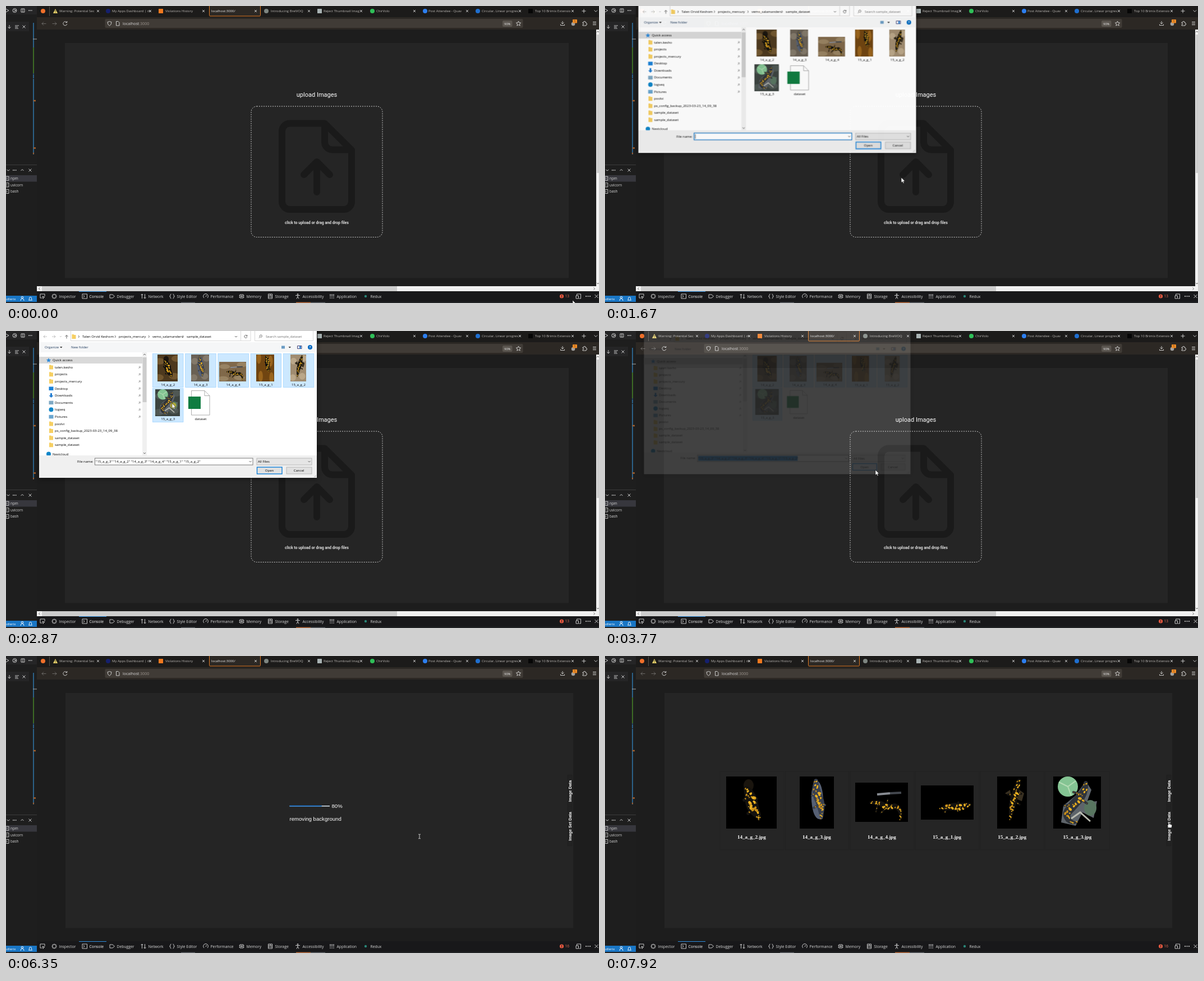
Write an HTML page that moves like this. It is 1057 px wide and 530 px high and loops after 7990 ms.

```html
<!DOCTYPE html>
<html lang="en">
<head>
<meta charset="utf-8">
<title>Image upload</title>
<style>
html, body { margin: 0; width: 100%; height: 100%; overflow: hidden; background: #1d1d1d; }
svg { display: block; }
#stage { width: 1057px; height: 530px; font: 6px "Open Sans", "Noto Sans", sans-serif; }
.ui { font-size: 6.8px; fill: #d8d8d8; }
.line { fill: none; stroke: #d8d8d8; stroke-width: .9; }
.dim { opacity: .4; }
.din { font-family: Roboto, sans-serif; text-anchor: middle; fill: #fff; }
.arial { font: 9.6px "Liberation Sans", Arial, sans-serif; fill: #fff; }
.side { font: bold 7.2px "Liberation Sans", Arial, sans-serif; fill: #fff; text-anchor: middle; }
.name { font: bold 9px "Liberation Serif", serif; fill: #fff; text-anchor: middle; }
.mid { text-anchor: middle; }
.dark { stroke: #555; }
#dialog { transform-origin: 306px 95px; filter: drop-shadow(0 1px 4px #0008); }
</style>
</head>
<body>
<svg id="stage" viewBox="0 0 1057 530">
  <rect width="1057" height="530" fill="#1d1d1d"/>

  <g id="editor">
    <rect width="55" height="530" fill="#1e1e1e"/>
    <rect width="55" height="15" fill="#252526"/>
    <rect y="28" width="41" height="17" fill="#252526"/>
    <path class="line" d="M-2 4l7 4-7 4M12 8a3.5 3.5 0 1 0 7 0a3.5 3.5 0 1 0-7 0M14 6l4 2-4 2M27 5h6v6h-6zM30 5v6M6 34v6m-2.500-2.500l2.500 2.500 2.500-2.500M16 35h7M16 37.500h5M16 40h6M29.500 34.500l5 5m0-5l-5 5"/>
    <path d="M40 8h1.500m1 0h1.500m1 0h1.500M12 293h1.500m1 0h1.500m1 0h1.500" stroke="#ccc" stroke-width="1.300"/>
    <path d="M49 30V265" stroke="#2b6188" stroke-width="2"/>
    <path d="M49 74V120" stroke="#3d6b25" stroke-width="2"/>
    <path d="M49 121v1m0 7v1" stroke="#1e1e1e" stroke-width="3"/>
    <path d="M48 59h7" stroke="#aaa"/>
    <path d="M49 169h4M49 253.500h4M48 263h2" stroke="#a5602d" stroke-width="2.500"/>
    <path d="M0 283.500H55" stroke="#3c3c3c"/>
    <path class="line" d="M1.500 292l2.500 2 2.500-2M26.500 294l2.500-2.500 2.500 2.500M40.500 290.500l5 5m0-5l-5 5"/>
    <rect y="302" width="55" height="11.500" fill="#37373d"/>
    <g id="shells" class="ui" style="font-size:6.400px"></g>
    <rect y="517" width="55" height="11" fill="#1976c5"/>
    <text x="-2" y="525.200" fill="#fff">udlerix</text>
    <path class="line" style="stroke:#fff" d="M26 526q0-4 3-4t3 4M27 520a2 1.500 0 1 0 4 0a2 1.500 0 1 0-4 0M40.500 525h6l-1-1.500v-2a2 2 0 0 0-4 0v2z"/>
  </g>

  <g id="upload" data-on="0-4020">
    <rect x="105" y="66" width="898" height="419.500" fill="#252525"/>
    <text class="din" x="554" y="162" font-size="11">upload Images</text>
    <rect x="437" y="179" width="234" height="233.500" rx="10" fill="none" stroke="#ddd" stroke-width=".9" stroke-dasharray="2 2"/>
    <path d="M506 209.500H568L616 257V349a14 14 0 0 1-14 14H506a14 14 0 0 1-14-14V223.500a14 14 0 0 1 14-14zM568 211V243a13.500 13.500 0 0 0 13.500 13.500H614M554 332V278m-23 23l23-23 23 23" fill="none" stroke="#1a1a1a" stroke-width="12" stroke-linecap="round" stroke-linejoin="round"/>
    <text class="din" x="554" y="388.500" font-size="7" font-weight="500">click to upload or drag and drop files</text>
    <path d="M55 500H1057V42H1052V509H55z" fill="#f0f0f0"/>
    <rect x="55" y="500" width="1002" height="9" fill="#f0f0f0"/>
    <path d="M64 500H697V509H64zM1053 51H1057V298H1053z" fill="#cdcdcd"/>
    <path class="line dark" d="M60.500 502.500l-2 2 2 2M1047.500 502.500l2 2-2 2M1053 47l2-2 2 2M1053 494l2 2 2-2"/>
  </g>

  <g id="work" data-on="4020-7990">
    <rect x="106" y="66" width="905" height="419.500" fill="#252525"/>
    <path d="M1001 212h8v56h-8zM1001 269h8v70h-8z" fill="#222" stroke="#1e1e1e" stroke-width=".5"/>
    <text class="side" transform="translate(1007.600 241) rotate(-90)">Image Data</text>
    <text class="side" transform="translate(1007.600 304) rotate(-90)">Image Set Data</text>
    <g id="progress"></g>
    <g id="results" data-on="6550-7990"></g>
  </g>

  <g id="browser">
    <rect x="55" width="1002" height="20" fill="#1c1b1a"/>
    <rect x="55" y="20" width="1002" height="22" fill="#2c2824"/>
    <rect x="362.500" y="-2" width="91" height="20" rx="1.500" fill="#2c2824" stroke="#e07a22"/>
    <circle cx="66" cy="9" r="4" fill="#f0702a"/>
    <path d="M77.500 1V18" stroke="#55504a"/>
    <g id="tabs"></g>
    <path class="line" d="M1026.500 9h7m-3.500-3.500v7M1048.500 7.500l2.800 2.800 2.800-2.800"/>
    <rect x="176.500" y="23" width="745" height="16" rx="2" fill="#403b36"/>
    <path class="line dim" d="M71.500 31.500h-7.500m3-3l-3 3 3 3M82.500 31.500h7.500m-3-3l3 3-3 3"/>
    <path class="line" d="M108 29a3.500 3.500 0 1 0 .8 3M108.800 27v2.500h-2.500M184.500 27.500l3.500 1.200q0 5-3.500 6.500-3.500-1.500-3.500-6.500zM196.500 27.500h3.500l2 2v5.500h-5.500zM913.500 27l1.200 2.800 3 .3-2.300 2 .8 3-2.700-1.600-2.700 1.600.8-3-2.300-2 3-.3zM992 27v5m-2.500-2.500l2.500 2.500 2.500-2.500M988.500 32.500v2h7v-2M1028 29h2a1.300 1.300 0 1 1 2.500 0h1.500v2a1.300 1.300 0 1 1 0 2.500v1.500h-6v-2a1.200 1.200 0 1 0 0-2zM1046 28.500h6M1046 31h6M1046 33.500h6"/>
    <text class="ui" x="208" y="34" style="font-size:7px">localhost<tspan fill="#9b958e">:3000</tspan></text>
    <rect x="885" y="26" width="17.500" height="11" rx="2" fill="#5a554f"/>
    <text class="mid" x="893.700" y="33.700" fill="#eee" font-size="5.500">90%</text>
    <circle cx="1011" cy="32" r="3.300" fill="#a0a0a0"/>
    <rect x="1010" y="24" width="8" height="6.500" rx="1" fill="#f08a24"/>
    <text class="mid" x="1014" y="29.300" font-size="5" fill="#222">1</text>
  </g>

  <g id="devtools">
    <rect x="55" y="509" width="1002" height="19" fill="#18181a"/>
    <path d="M130 509.500H179" stroke="#2f8fe0" stroke-width="1.200"/>
    <rect y="528" width="1057" height="2" fill="#222426"/>
    <path d="M312 529.300h25" stroke="#70757a"/>
    <path d="M517 529.300h26" stroke="#c8703a" stroke-width="1.300"/>
    <path d="M543 529.300h26" stroke="#70757a"/>
    <g id="tools" class="ui"></g>
    <circle cx="990.500" cy="518" r="3.600" fill="#e2573f"/>
    <path d="M990.500 516v2.500m0 .8v1" stroke="#18181a"/>
    <g id="errors" class="ui" style="fill:#e0705a;font-size:6.400px"></g>
    <path class="line" d="M1017.500 517v-3h7v8h-3M1016 517h4.500v5h-4.500zM1049.500 515l6 6m0-6l-6 6"/>
    <path d="M1033 518h2m1.500 0h2m1.500 0h2" stroke="#d8d8d8" stroke-width="1.700"/>
  </g>

  <g id="dialog">
    <rect x="59" y="-10" width="495" height="272" fill="#fff"/>
    <rect x="59" y="222" width="495" height="40" fill="#f0f0f0"/>
    <g data-on="1600-7990">
      <rect x="59" y="20" width="495" height="18" fill="#f5f6f7"/>
      <path d="M115.500-2H436V17.500H115.500zM418.500 0V17M443.500-2H547.500V17.500H443.500z" fill="none" stroke="#d9d9d9"/>
      <path class="line dim dark" d="M73 10h-6m2.500-2.500l-2.500 2.500 2.500 2.500M82 10h6m-2.500-2.500l2.500 2.500-2.500 2.500M96 9l1.500 1.500 1.500-1.500"/>
      <path class="line dark" d="M108 13.500v-6m-2.500 2.500l2.500-2.500 2.500 2.500M408 9l2 2 2-2M429.500 8.500a2.500 2.500 0 1 0 .3 2M429.800 7v2h-2M451 12.500l2-2a2 2 0 1 1 1 .5"/>
      <path d="M117.500 6h3l1 1h3v7h-7z" fill="#f6cf63"/>
      <g id="crumbs"></g>
      <text x="463" y="12" fill="#6d6d6d">Search sample_dataset</text>
      <text x="69" y="31" fill="#1e395b">Organize</text>
      <path d="M96 28h4.500l-2.250 2.500zM503.500 28h4.500l-2.250 2.500z" fill="#333"/>
      <text x="116" y="31" fill="#1e395b">New folder</text>
      <rect x="491" y="26.500" width="6" height="5" fill="#6b9cc4"/>
      <path d="M519.500 26.500h7.500v5h-7.500z" fill="#fff" stroke="#447"/>
      <path d="M524.500 27v4.500" stroke="#3a8bd8" stroke-width="3"/>
      <circle cx="542" cy="29" r="4" fill="#0068c0"/>
      <text class="mid" x="542" y="31.300" fill="#fff" font-weight="bold">?</text>

      <rect x="59" y="46" width="184" height="12" fill="#d9d9d9"/>
      <rect x="243" y="38" width="8" height="184" fill="#f0f0f0"/>
      <rect x="243.500" y="47" width="7" height="80" fill="#cdcdcd"/>
      <path class="line dark" d="M245 43l2-2 2 2M245 217l2 2 2-2"/>
      <svg x="59" y="38" width="184" height="184" viewBox="59 38 184 184"><g id="places"></g></svg>
      <g id="files"></g>

      <text x="127" y="235">File name:</text>
      <rect x="158.500" y="227" width="281.500" height="12" fill="#fff" stroke="#7a7a7a"/>
      <rect data-on="0-2460" x="158.500" y="227" width="281.500" height="12" fill="#fff" stroke="#0078d7"/>
      <path data-on="1670-2460" d="M160.700 229v8" stroke="#000" stroke-width=".7"/>
      <text data-on="2460-2800" x="160" y="235">14_a_g_2</text>
      <rect data-on="3550-7990" x="160" y="228.500" width="185" height="9" fill="#0078d7"/>
      <text data-on="2800-7990" x="160" y="235">"15_a_g_3" "14_a_g_2" "14_a_g_3" "14_a_g_4" "15_a_g_1" "15_a_g_2"</text>
      <rect x="447" y="227" width="98" height="12" fill="#e5e5e5" stroke="#adadad" stroke-width=".8"/>
      <text x="449" y="235">All Files</text>
      <path class="line dark" d="M433.500 232l2 2 2-2M538.500 232l2 2 2-2"/>
      <rect x="447.500" y="243" width="44.500" height="12" fill="#e1e1e1" stroke="#0078d7" stroke-width="1.300"/>
      <rect data-on="3130-7990" x="447.500" y="243" width="44.500" height="12" fill="#e5f1fb" stroke="#0078d7"/>
      <text class="mid" x="469.500" y="251">Open</text>
      <rect x="500" y="243" width="45" height="12" fill="#e1e1e1" stroke="#adadad" stroke-width=".8"/>
      <text class="mid" x="522" y="251">Cancel</text>
      <path d="M549 261l4-4m-2 4l2-2" stroke="#aaa" stroke-width=".7"/>
    </g>
  </g>

  <g id="cursor">
    <circle data-on="960-1100 2460-2530 2800-2940 3270-3400" cx="2" cy="4" r="5.500" fill="#e8d020" opacity=".6"/>
    <path data-on="0-4090 7220-7850" d="M0 0V9.300L2.200 7.300 3.700 10.600 5.200 10 3.800 6.700H6.600z" fill="#fff" stroke="#000" stroke-width=".5"/>
    <path data-on="4090-7220" d="M-2-3.800h1.500l.5.500.5-.5h1.500M-2 3.800h1.500l.5-.5.5.500h1.500M0-3.500v7" fill="none" stroke="#ddd" stroke-width=".9"/>
    <path data-on="7850-7990" d="M0 0q1-1 1.800 0V4l4 1q1 .5.800 2l-.8 3.500h-5L-1.500 6.500q0-1 1.500-.8z" fill="#fff" stroke="#000" stroke-width=".5"/>
  </g>
</svg>

<script>
const LOOP = 7990;
const fill = (id, list, draw) => document.getElementById(id).innerHTML = list.map(draw).join('');
const text = (x, y, s, attrs = '') => `<text x="${x}" y="${y}" ${attrs}>${s}</text>`;

fill('shells', ['npm', 'uvicorn', 'bash'], (s, i) => {
  const y = 307.7 + i * 11.6;
  return `<path class="line" d="M-2 ${y - 3.5}h7v7h-7M0 ${y - 2}l2 2-2 2"/>` + text(8, y + 2.4, s);
});

const tabIcons = {
  circle: x => `<circle cx="${x}" cy="9" r="4"/>`,
  square: x => `<rect x="${x - 4}" y="5" width="8" height="8" rx=".5"/>`,
  warning: x => `<path d="M${x} 5l4 8h-8z"/><path d="M${x} 7.5v2.500m0 1v1" stroke="#222"/>`
};
// icon x, colour, shape, text x, title, close x
fill('tabs', [
  [88, '#e9d36a', 'warning', 95, 'Warning: Potential Sec', 164],
  [182, '#16206e', 'circle', 189, 'My Apps Dashboard | m', 257],
  [276, '#f0791f', 'square', 284, 'Violations History', 352],
  [0, '', '', 366, 'localhost:3000/', 445],
  [464, '#7d8580', 'circle', 472, 'Introducing BrelVOQ', 540],
  [559, '#a9b3b3', 'square', 566, 'Reject Thumbnail Imag', 633],
  [653, '#2fbf58', 'circle', 660, 'ChirVolo', 728],
  [747, '#2d7ff0', 'circle', 753, 'Post Attendee - Quav', 822],
  [841, '#1f6fd0', 'circle', 848, 'Circular, Linear progres', 916],
  [935, '#060606', 'square', 943, 'Top 10 Brimix Extensio', 1010]
], ([ix, color, shape, x, title, cx]) =>
  (shape ? `<g fill="${color}">${tabIcons[shape](ix)}</g>` : '') +
  text(x, 11.2, title, `fill="${shape ? '#bdbab6' : '#eee'}"`) +
  `<path class="line" d="M${cx - 2} 7l4 4m0-4l-4 4"/>`);

// icon x, icon path around 0,0, label
fill('tools', [
  [65, 'M-1 3h-3v-7h8v4M0 0l4 1.500-2 .8-.8 2z', ''],
  [86, 'M-3-3h6v6h-6zM-4.500 0h1.500M3 0h1.500M0-4.500v1.500M0 3v1.500', 'Inspector'],
  [140, 'M-4-4h8.500v8h-8.500zM-2-2l2 2-2 2', 'Console'],
  [189, 'M-4-3h5l3.500 3-3.500 3h-5z', 'Debugger'],
  [245, 'M-2.500 4v-8m-2 2l2-2 2 2M2.500-4v8m-2-2l2 2 2-2', 'Network'],
  [296, 'M-1.500-4q-1.500 0-1.500 2t-1.500 2q1.500 0 1.500 2t1.500 2M1.500-4q1.500 0 1.500 2t1.500 2q-1.500 0-1.500 2t-1.500 2', 'Style Editor'],
  [356, 'M-3 3a4.300 4.300 0 1 1 6 0M0 1l1.500-3', 'Performance'],
  [420, 'M-3-3h6v6h-6zM-4.500-1.500h1.500M-4.500 1.500h1.500M3-1.500h1.500M3 1.500h1.500M-1-1h2v2h-2z', 'Memory'],
  [471, 'M-3.500-4h7v8h-7zM-3.500-1.300h7M-3.500 1.300h7M-1-2.600h2', 'Storage'],
  [520, 'M-4-1.500h8M0-1.500v2l-2 4M0 .5l2 4M-1-3.500a1 1 0 1 0 2 0a1 1 0 1 0-2 0', 'Accessibility'],
  [581, 'M-4-3h2m1 0h2m1 0h2M-4 0h2m1 0h2m1 0h2M-4 3h2m1 0h2m1 0h2M-4-2h2m1 0h2m1 0h2', 'Application'],
  [641, '', 'Redux']
], ([x, d, label]) =>
  (d ? `<path class="line" transform="translate(${x} 518)" d="${d}"/>` : `<circle cx="${x}" cy="518" r="2.200" fill="#2a8577"/>`) +
  text(x + 8.5, 520.6, label, label == 'Console' ? 'fill="#fff"' : ''));

fill('errors', [[13, 0, 4690], [14, 4690, 4750], [15, 4750, 5010], [16, 5010, LOOP]],
  ([n, a, b]) => text(996.5, 520.4, n, `data-on="${a}-${b}"`));

fill('crumbs', [[136, 'Talen Orvid Keshom'], [201, 'projects_mercury'], [261, 'vemo_salamanders'], [322, 'sample_dataset']],
  ([x, s]) => `<path class="line dark" d="M${x - 7} 8l1.500 2-1.500 2"/>` + text(x, 12, s));

const placeColors = { Desktop: '#1a82d8', Documents: '#7fa9c4', Pictures: '#6aa6cf' };
fill('places', ['Quick access', 'talen.kesho', 'projects', 'projects_mercury', 'Desktop', 'Downloads', 'Documents',
  'logseq', 'Pictures', 'poolvi', 'ps_config_backup_2023-03-23_14_09_38', 'sample_dataset', 'sample_dataset', 'Nextcloud'], (s, i) => {
  const root = i == 0 || i == 13, x = root ? 76 : 80.5, y = i == 13 ? 219.5 : 52 + i * 12.6;
  const round = s == 'logseq' || s == 'Nextcloud';
  const icon = i == 0 ? `<path d="M76 ${y - 4}l1.200 2.800 3 .2-2.300 2 .8 3-2.700-1.700-2.700 1.700.8-3-2.300-2 3-.2z" fill="#2f8ad8"/>`
    : round ? `<circle cx="${x}" cy="${y}" r="4" fill="#0f86c9"/>`
    : s == 'Downloads' ? `<path d="M79 ${y - 4}h3v4h2.500l-4 4-4-4h2.500z" fill="#1f7bd0"/>`
    : placeColors[s] ? `<rect x="${x - 4}" y="${y - 3}" width="8" height="6.500" fill="${placeColors[s]}"/>`
    : `<path d="M77 ${y - 4}h3l1 1h3v7h-7z" fill="#f6cf63"/>`;
  const pin = i > 0 && i < 9 ? `<path d="M236.500 ${y + 2}l1.500-1.500m-1-1.500l2.500 2.500m-1.500-3.500l2 2" stroke="#777" stroke-width=".9"/>` : '';
  return icon + pin + text(root ? 83 : 87, y + 2.1, s);
});

// w/h: picture size, at: place in results, thumb: x y w h, body: spine path
const photos = [
  { name: '14_a_g_2', w: 90, h: 93, at: [216, 215], thumb: [270, 42, 36, 48], bg: '#4d391e', tint: '#8a6a3a', skin: '#14120f',
    back: '<ellipse cx="40" cy="16" rx="9" ry="11" fill="#1a150e"/>', body: 'M36 22Q42 30 45 45T56 68L59 78', legs: 'M40 34l-8 8M47 58l-8 8M44 36l10 4', size: 22 },
  { name: '14_a_g_3', w: 61, h: 93, at: [347, 215], thumb: [330, 42, 32, 48], bg: '#6a6154', tint: '#94897a', skin: '#3a4150',
    back: '<path d="M28 6Q40 8 42 40T40 76Q26 80 22 52T28 6" fill="#566074"/>', body: 'M29 8Q28 26 34 40T38 76', legs: 'M30 26l-8 8M35 50l-10 6M36 46l9 5', size: 16 },
  { name: '14_a_g_4', w: 94, h: 70, at: [446, 226], thumb: [380, 55, 48, 35], bg: '#80694a', tint: '#a89473', skin: '#14120f',
    back: '<path d="M39 21L62 19" stroke="#878b92" stroke-width="4"/><path d="M62 19L82 18" stroke="#44484f" stroke-width="4"/>', body: 'M28 36Q40 34 50 40T70 42Q84 46 80 67', legs: 'M40 38l-3 14M58 42l-12 12M56 40l2-10', size: 11 },
  { name: '15_a_g_1', w: 94, h: 61, at: [563, 231], thumb: [446, 42, 32, 48], bg: '#704511', tint: '#b57a24', skin: '#14120f',
    back: '', body: 'M86 34Q74 38 60 38T34 42', legs: 'M46 40l-3 8M62 38l4 8M64 36l3-6', size: 14, turn: true },
  { name: '15_a_g_2', w: 53, h: 93, at: [699, 215], thumb: [507, 42, 28, 48], bg: '#a08c70', tint: '#cbb999', skin: '#14120f',
    back: '<path d="M34 20L48 30 44 44 34 40M14 30l9-6 2 12z" fill="#393021"/>', body: 'M39 7Q34 24 30 38T23 78', legs: 'M33 26l10 5M30 44l10 6M31 32l-12 0', size: 13 },
  { name: '15_a_g_3', w: 85, h: 93, at: [799, 215], thumb: [266, 104, 44, 48], bg: '#3c4440', tint: '#5b6460', skin: '#30343a',
    back: '<path d="M40 34L58 8 68 24 60 46 78 44 72 74 52 64 40 88 14 82 18 52z" fill="#5e646a"/><circle cx="26" cy="18" r="18" fill="#84c493"/><path d="M26 18L10 10M26 18L40 8M26 18L32 34" stroke="#b4dcb4" stroke-width="2"/><ellipse cx="66" cy="56" rx="11" ry="14" fill="#587560"/><path d="M28 78L48 64 66 80" stroke="#b9bab0" stroke-width="3" fill="none"/>',
    body: 'M58 12Q56 30 44 42T24 66Q24 84 44 82', legs: 'M50 32l-14-4M36 50l-16 2M48 40l12 8', size: 17 }
];

function random(seed) {
  return () => (seed = seed * 16807 % 2147483647) / 2147483647;
}

// A tapering body along its spine, scattered with yellow spots
function salamander({ body, legs, size, skin }) {
  const spine = document.createElementNS('http://www.w3.org/2000/svg', 'path');
  spine.setAttribute('d', body);
  const length = spine.getTotalLength(), rnd = random(4711);
  const at = t => spine.getPointAtLength(t * length);
  const radius = t => size / 2 * Math.sin(Math.PI * (t * .8 + .15));
  let out = `<path d="${legs}" fill="none" stroke="${skin}" stroke-width="${size * .25}" stroke-linecap="round"/>`;
  for (let t = 0; t <= 1; t += .04) {
    const p = at(t);
    out += `<circle cx="${p.x}" cy="${p.y}" r="${radius(t)}" fill="${skin}"/>`;
  }
  for (let i = 0; i < 30; i++) {
    const t = (i + rnd()) / 30, p = at(t), r = radius(t);
    const x = p.x + (rnd() - .5) * 1.5 * r, y = p.y + (rnd() - .5) * 1.5 * r, s = .7 + r * .2 * rnd();
    out += `<ellipse cx="${x}" cy="${y}" rx="${s * 1.5}" ry="${s}" transform="rotate(${rnd() * 180} ${x} ${y})" fill="${rnd() < .6 ? '#eab022' : '#c88e1a'}"/>`;
  }
  return out + `<path d="${legs}" fill="none" stroke="#c8921c" stroke-width="${size * .12}" stroke-dasharray="2 5"/>`;
}

function photo(p, x, y, w, h, onRock) {
  const rock = [[.2, .25], [.85, .15], [.75, .8], [.15, .85]].map(([u, v]) =>
    `<ellipse cx="${u * p.w}" cy="${v * p.h}" rx="${p.w * .2}" ry="${p.h * .12}" fill="${p.tint}" opacity=".6"/>`).join('');
  return `<svg x="${x}" y="${y}" width="${w}" height="${h}" viewBox="0 0 ${p.w} ${p.h}" preserveAspectRatio="xMidYMid slice">
    <rect width="${p.w}" height="${p.h}" fill="${onRock ? p.bg : '#000'}"/>${onRock ? rock : ''}${p.back}${salamander(p)}</svg>`;
}

const tile = (x, y, on, color, edge) =>
  `<rect data-on="${on}" x="${x + .5}" y="${y + .5}" width="54.500" height="60" fill="${color}" stroke="${edge}" stroke-width=".7"/>`;

fill('files', photos, (p, i) => {
  const x = 261 + i % 5 * 58.2, y = i < 5 ? 40 : 102, [tx, ty, w, h] = p.thumb;
  const thumb = p.turn
    ? `<g transform="translate(${tx} ${ty + h}) rotate(-90)">${photo(p, 0, 0, h, w, true)}</g>`
    : photo(p, tx, ty, w, h, true);
  return (i == 0 ? tile(x, y, '2320-2460', '#e5f3ff', '#e5f3ff') : '') +
    tile(x, y, (i ? 2800 : 2460) + '-7990', '#cce8ff', '#99d1ff') +
    thumb + text(x + 27.7, i < 5 ? 98 : 159, p.name, 'class="mid"');
});
document.getElementById('files').innerHTML +=
  '<path d="M330.500 106.500H354L363 115.500V150H330.500zM354 106.500V115.500H363" fill="#fff" stroke="#999" stroke-width=".8"/>' +
  '<rect x="325" y="117" width="22" height="22" fill="#107c41"/>' + text(347, 159, 'dataset', 'class="mid"');

fill('results', photos, (p, i) => {
  const x = 205 + i * 116.1;
  return `<rect x="${x}" y="206" width="113.500" height="140" fill="none" stroke="#222"/>` +
    photo(p, ...p.at, p.w, p.h, false) + text(x + 56.3, 326, p.name + '.jpg', 'class="name"');
});

// from, to, percent
const upload = [[4550, 4690, 0], [4690, 4750, 50], [4750, 5010, 100]];
const remove = [[5010, 5140, 0], [5140, 5280, 20], [5280, 5760, 40], [5760, 6350, 60], [6350, 6480, 80], [6480, 6550, 100]];
const bar = (label, x, w) => ([a, b, pct]) => `<g class="arial" data-on="${a}-${b}">
  <path d="M${x} 267.700h${w}" stroke="#dce9f5" stroke-width="1.600"/><path d="M${x} 267.700h${w * pct / 100}" stroke="#1976d2" stroke-width="1.800"/>
  ${text(x + w + 3.5, 271.4, pct + '%')}${text(x, 294, label)}</g>`;
fill('progress', [0], () => upload.map(bar('uploading images to the server', 486, 108)).join('') +
  remove.map(bar('removing background', 505.5, 71.5)).join(''));

let css = '';
function animate(id, ease, steps) {
  const frames = steps.map(([t, rule]) => `${(t / LOOP * 100).toFixed(4)}%{${rule}}`).join('');
  css += `@keyframes ${id}{${frames}}#${id}{animation:${id} ${LOOP}ms ${ease} infinite}`;
}

// data-on="from-to ..." shows an element during those spans
document.querySelectorAll('[data-on]').forEach((el, i) => {
  el.id = el.id || 'on' + i;
  const shown = el.getAttribute('opacity') || 1;
  const spans = el.dataset.on.split(' ').map(s => s.split('-'));
  animate(el.id, 'step-end', [[0, 'opacity:0'],
    ...spans.flatMap(([a, b]) => [[a, 'opacity:' + shown], [b, 'opacity:0']])]);
});

const pose = (opacity, scale) => `opacity:${opacity};transform:scale(${scale})`;
animate('dialog', 'linear', [[0, pose(0, .95)], [1460, pose(0, .95)], [1530, pose(.2, .958)], [1600, pose(.75, .985)], [1680, pose(1, 1)],
  [3690, pose(1, 1)], [3770, pose(.14, .958)], [3820, pose(0, .95)], [LOOP, pose(0, .95)]]);

animate('cursor', 'ease-in-out', [[0, 1010, 525], [70, 1010, 525], [830, 589, 387.5], [1560, 589, 387.5], [1900, 315, 21], [2130, 315, 21],
  [2320, 290, 72], [2480, 290, 72], [2740, 296, 129], [2940, 296, 129], [3200, 478, 247], [3700, 482, 248], [4080, 482, 248],
  [4090, 485, 254.5], [5759, 485, 254.5], [5760, 737, 322], [7120, 737, 322], [7920, 1004, 296], [LOOP, 1004, 296]
].map(([t, x, y]) => [t, `transform:translate(${x}px,${y}px)`]));

document.head.appendChild(document.createElement('style')).textContent = css;
</script>
</body>
</html>
```
